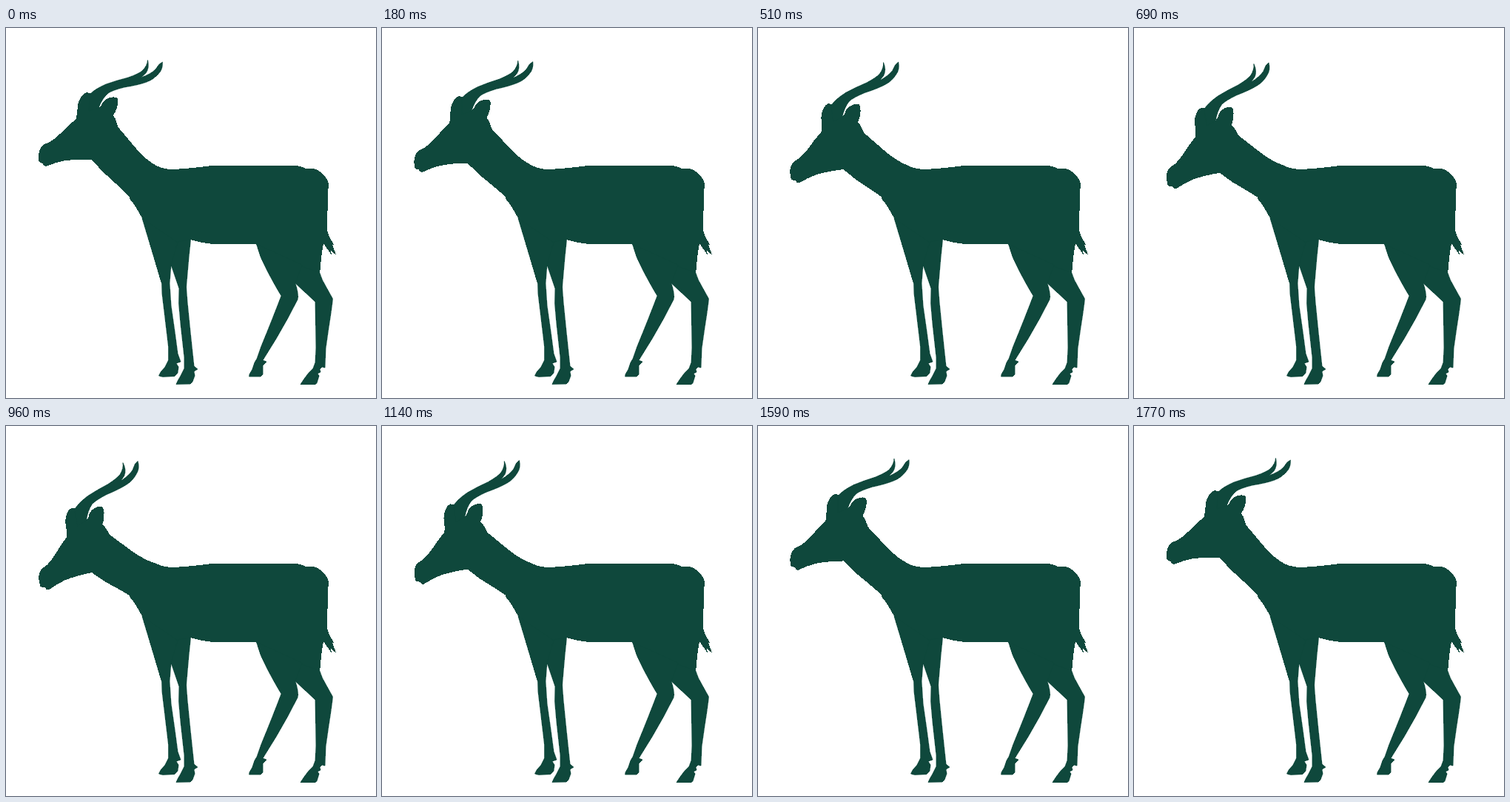
Recreate the animation shown at these times as an HTML page. Size 500 by 500 pixels, loop 1.8 s.

```html
<!DOCTYPE html>
<html lang="en">
<head>
<meta charset="utf-8">
<title>Antelope</title>
<style>
  html, body { margin: 0; width: 100%; height: 100%; overflow: hidden; background: #fff; }
  svg { display: block; width: 100vw; height: 100vh; fill: #0f483c; shape-rendering: crispEdges; }
  .limb { stroke: #0f483c; stroke-width: .8; stroke-linejoin: round; }
</style>
</head>
<body>
<svg viewBox="0 0 500 500">
  <!-- torso and tail -->
  <path d="M203 186 Q212 190.500 224 191 Q240 190.500 262 188 Q275 186 290 185.500
    H388 Q397 186 405 190 L414 189.500 Q423 191.500 430 199.500 Q436 206 436 213 L435 222 L434 273
    L437 282 L443 293 L441 293 L446 306.500 L439 301 L440 307 L429 291
    L426 310 L424 333 L391 345 L372 362 L338 292
    Q310 293 280 292 Q262 290 249.500 286 L246 320 L223 322 L210 345
    L184 257 Q175 240 166.500 230 L190 205 Z"/>
  <!-- hind legs -->
  <g class="limb">
    <path d="M395 320 L424 331 Q427 341 431 347 L441.500 366 Q440 380 436 405 L432 433 L431 459
      L427 458 L424 461 L425 465 L421 467 L423 470 L420 480 L418 481.500 H398 L403 474
      L409 466 L415 460 L418 452 L419 432 L418 370 L391 345 Z"/>
    <path d="M338.500 292 Q343 310 353 328 Q364 349 372 362 Q361 391 345 430 L339 447 L336 452
      L333 461 L329 468 L328.500 471 H344 L347 468 L347 456 L352 451 L347 449 L365 420
      Q381 393 394 367 Q396 361 391 345 L400 320 Z"/>
  </g>
  <!-- front legs -->
  <g class="limb">
    <path d="M249.500 286 L247 310 L243.500 350 L245 370 L249 410 L254 457 L259 461
      L254 464 L255 470 L252 478 L249 481 L230 481.500 L232 477 L236 470 L241 460 V445
      L236 400 L233.500 372 L234 352 L223 320 L225 290 Z"/>
    <path d="M184 257 L194 290 L210.500 345 L211 359 L214.500 388 L219.500 430 L219.500 449 L215 458
      L209 465 L206.500 470 L212 471.500 L228 470.500 L232 466 L233 458 L230 453 L236 451 L232 440
      L228 410 L223 375 L221 345 L223 320 L232 290 Z"/>
  </g>
  <g id="head">
    <!-- skull and neck -->
    <path d="M116 178 Q95 177 78 179.500 Q66 182 54 187 L51 186 L50 183 L46 182 L44 180
      V172 Q45 162 51 157.500 L60 153.500 Q70 147 82 134 L94.500 123 L96 116 L97 104
      Q99 95 105 89 L109 87 L117 89 L128 98 L125 107 L135 112 L145 118 L148 123
      L151.500 134 L165 150 L176 163 Q190 179 203 186 L207 192 L205 215
      L190 232 L172 233 L160 221.500 L148 210 L130 193.500 Z"/>
    <!-- horns -->
    <path class="limb" d="M113 90 Q119 83 135 76 Q149 71 165 67 Q179 62 184 58 Q191 51 191.500 43.500
      Q194 54 189 61 L182.500 67 Q196 62 202 56 L207 49 L211.500 46
      Q212 56 206 62 Q199 70 190 73 Q179 77 160 80 Q144 84 138 88
      Q130 95 125 108 L112 112 Z"/>
    <!-- ear -->
    <path d="M125.500 107.500 L129 104 Q132 97 138 95 Q143 92.500 150 94 L151.500 98
      Q151 109 145 118 L132 122 Z"/>
  </g>
</svg>
<script>
  const STEP = 30, DOWN = 29, UP = 30, SWING = 15;
  const head = document.getElementById("head");
  let start;

  // Constant-speed nod: down and back up, in discrete steps.
  function draw(now) {
    start ??= now;
    const k = Math.floor((now - start) / STEP) % (DOWN + UP + 1);
    const angle = -SWING * Math.min(k / DOWN, (DOWN + UP - k) / UP);
    head.setAttribute("transform", `rotate(${angle} 201 188)`);
    requestAnimationFrame(draw);
  }
  requestAnimationFrame(draw);
</script>
</body>
</html>
```
